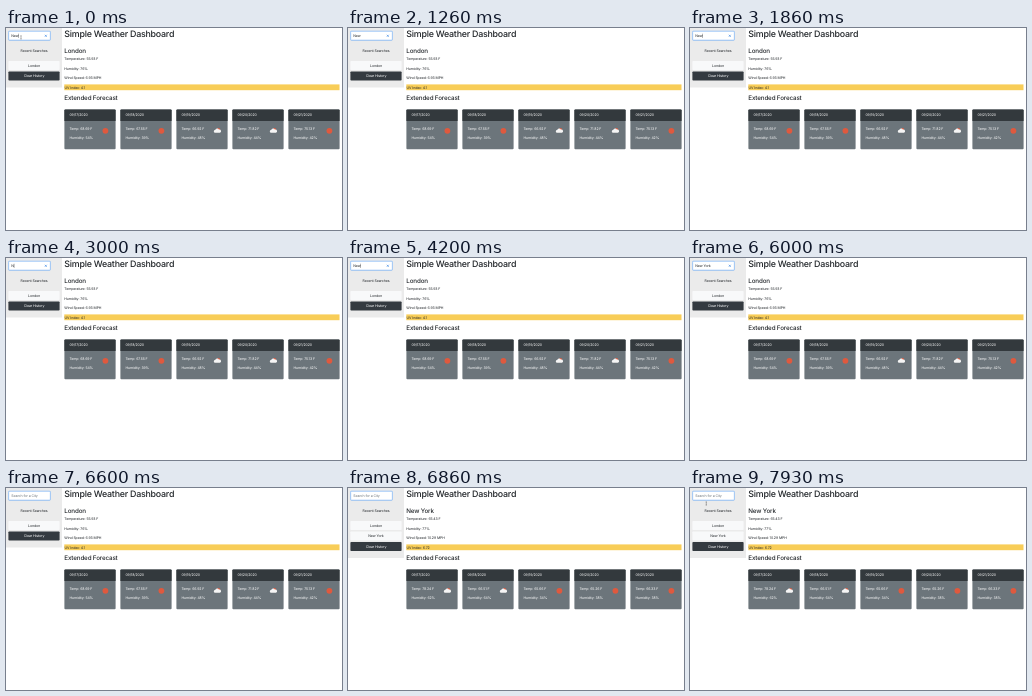
Recreate the animation shown at these times as an HTML page. Size 336x202 px, loop 8000 ms.

```html
<!DOCTYPE html>
<html lang="en">
<head>
<meta charset="utf-8">
<title>Weather Dashboard</title>
<style>
  html, body { margin: 0; width: 100%; height: 100%; overflow: hidden; background: #fff; }
  svg { display: block; width: 336px; height: 202px; }
  text {
    font: 400 3.56px Inter, "Liberation Sans", sans-serif;
    letter-spacing: -.027em;
    fill: #212529;
    text-rendering: geometricPrecision;
    white-space: pre;
  }
  .h1 { font-size: 8.9px; font-weight: 500; }
  .h3 { font-size: 6.25px; font-weight: 500; letter-spacing: -.024em; }
  .mid { text-anchor: middle; }
  .light { fill: #fff; }
  .hint { fill: #6c757d; }
</style>
</head>
<body>
<svg id="stage" viewBox="0 0 336 202">
  <rect id="side" width="56" fill="#ebebeb"/>
  <rect x="2.1" y="2.7" width="42.8" height="10" rx="1.4" fill="#007bff" opacity=".25"/>
  <rect x="2.7" y="3.3" width="41.6" height="8.8" rx=".9" fill="#fff" stroke="#72acf5" stroke-width=".5"/>
  <text id="field" x="5.3" y="9.1"></text>
  <rect id="caret" y="5.7" width=".35" height="4.2" fill="#212529"/>
  <path id="clear" d="M38.8 6.8l2 2m0-2l-2 2" stroke="#2f7fe0" stroke-width=".6"/>
  <text class="mid" x="28" y="23.9">Recent Searches</text>
  <g id="history"></g>
  <text class="h1" x="58.3" y="8.9">Simple Weather Dashboard</text>
  <g id="report"></g>
  <path id="beam" d="M-.7 -1.6h1.4M0 -1.6v3.2M-.7 1.6h1.4" fill="none" stroke="#444" stroke-width=".4"/>
</svg>
<script>
const LOOP = 8000;
const $ = id => document.getElementById(id);

const cities = [
  { name: 'London', temp: '55.93', hum: 76, wind: '6.93', uv: '4.1',
    days: [['68.69', 54], ['67.55', 39], ['66.92', 48, 1], ['71.82', 44, 1], ['75.13', 42]] },
  { name: 'New York', temp: '65.43', hum: 77, wind: '10.29', uv: '6.72',
    days: [['78.24', 62, 1], ['66.51', 64, 1], ['65.66', 34], ['65.26', 38], ['66.33', 38]] }
];

// Typed value from each time on
const typing = [
  [0, 'New'], [2400, 'Ne'], [2860, 'N'], [3330, 'Ne'], [4200, 'New'], [4600, 'New '],
  [4860, 'New Y'], [5130, 'New Yo'], [5260, 'New Yor'], [5460, 'New York'], [6460, '']
];
// Times at which the caret switches, starting visible
const blinks = [130, 860, 1260, 1860, 6000, 7130, 7660];
const RESULT_AT = 6860;

const text = (x, y, s, cls = '') => `<text class="${cls}" x="${x}" y="${y}">${s}</text>`;
const rect = (x, y, w, h, fill, rx = 0) =>
  `<rect x="${x}" y="${y}" width="${w}" height="${h}" rx="${rx}" fill="${fill}"/>`;

const sun = '<circle r="2.9" fill="#df593e"/>';
const cloud = `<circle cx="1.1" cy="-1" r="1.7" fill="#df593e"/>
  <path d="M-2.2 2a1.4 1.4 0 0 1 0-2.8a2 2 0 0 1 3.7-.4a1.6 1.6 0 0 1 1 3.2z" fill="#f5f5f5"/>`;

function card([temp, hum, cloudy], i) {
  return `<g transform="translate(${58.4 + 56 * i} 81.4)">
    ${rect(0, 0, 51.2, 39.8, '#6c757b', .9)}
    <path d="M0 11.7V.9a.9 .9 0 0 1 .9-.9H50.3a.9 .9 0 0 1 .9 .9V11.7z" fill="#33393d"/>
    ${text(5, 7.1, `09/${17 + i}/2020`, 'light')}
    ${text(5, 20.4, `Temp: ${temp} F`, 'light')}
    ${text(5, 29.6, `Humidity: ${hum}%`, 'light')}
    <g transform="translate(41 21.4)">${cloudy ? cloud : sun}</g>
  </g>`;
}

const report = c =>
  text(58.3, 25, c.name, 'h3') +
  text(58.3, 32, `Temperature: ${c.temp} F`) +
  text(58.3, 41.9, `Humidity: ${c.hum}%`) +
  text(58.3, 51.3, `Wind Speed: ${c.wind} MPH`) +
  rect(58.3, 56.4, 275.2, 5.8, '#f8cd58') +
  text(58.5, 60.5, `UV Index: ${c.uv}`) +
  text(58.3, 72.2, 'Extended Forecast', 'h3') +
  c.days.map(card).join('');

function history(count) {
  const item = (i, s, fill, cls) =>
    rect(2.4, 33 + 10.5 * i, 51.2, 9, fill, .8) + text(28, 38.8 + 10.5 * i, s, 'mid ' + cls);
  return cities.slice(0, count).map((c, i) => item(i, c.name, '#f8f9fa', '')).join('') +
    item(count, 'Clear History', '#343a40', 'light');
}

let shown = -1, lastValue = null;

function draw(t) {
  const city = t < RESULT_AT ? 0 : 1;
  if (city !== shown) {
    shown = city;
    $('report').innerHTML = report(cities[city]);
    $('history').innerHTML = history(city + 1);
    $('side').setAttribute('height', 59.5 + 10.5 * city);
  }

  const value = typing.filter(([at]) => at <= t).pop()[1];
  if (value !== lastValue) {
    lastValue = value;
    const field = $('field');
    field.textContent = value || 'Search for a City';
    field.setAttribute('class', value ? '' : 'hint');
    $('caret').setAttribute('x', 5.3 + (value ? field.getComputedTextLength() : 0));
    $('clear').style.display = value ? '' : 'none';
  }
  const caretOn = blinks.filter(at => at <= t).length % 2 === 0;
  $('caret').style.display = caretOn ? '' : 'none';

  // Pointer rests in the field, then drifts down at the end
  const moving = t >= 7130;
  const k = Math.min(1, Math.floor((t - 7130) / 80) / 10);
  $('beam').style.display = moving || t < 130 ? '' : 'none';
  $('beam').setAttribute('transform', moving ? `translate(16.3 ${9 + 6.5 * k})` : 'translate(15 9.4)');
}

const start = performance.now();
function tick() {
  draw((performance.now() - start) % LOOP);
  requestAnimationFrame(tick);
}
tick();
</script>
</body>
</html>
```
